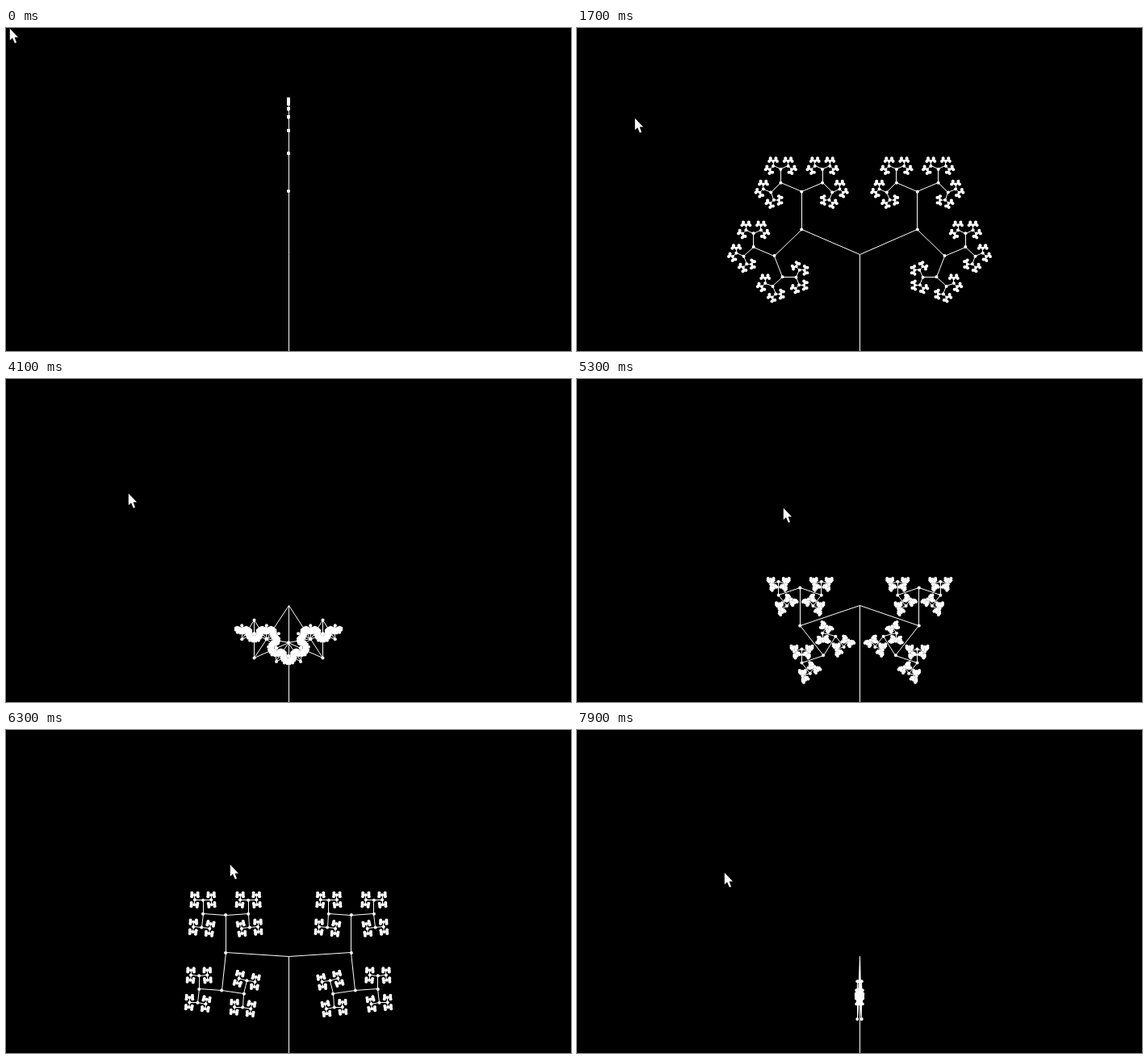
An HTML page with a canvas that plays this animation: 700x400 px, repeating every 8000 ms.

```html
<!DOCTYPE html>
<html lang="en">
<head>
<meta charset="utf-8">
<title>Recursive tree</title>
<style>
  html, body { margin: 0; width: 100%; height: 100%; overflow: hidden; background: #000; }
  canvas { display: block; }
</style>
</head>
<body>
<canvas id="stage" width="700" height="400"></canvas>
<script>
const ctx = document.getElementById("stage").getContext("2d");
const LOOP = 8000, STEP = 100;
const TRUNK = 120, FIRST = 78, RATIO = 0.6, MIN = 2, DOT = 2;
const RAD = Math.PI / 180;

// stops and turns of the pointer: [ms, x, y]
const stops = [
  [400, 4, 0], [1300, 42, 111], [1700, 71, 111], [2100, 98, 116],
  [3300, 98, 116], [3400, 98, 117], [4100, 151, 141], [5100, 223, 155],
  [5300, 255, 159], [5800, 293, 162], [5900, 293, 162], [6300, 277, 166],
  [6800, 254, 169], [7900, 182, 176]
];

const arrow = new Path2D("M0.8 0.8V15.3L4 12.3L6.8 18.8L9 18L6.6 11.6H11Z");

function pointerAt(t) {
  const i = Math.max(1, stops.findIndex(s => s[0] >= t));
  const [t0, x0, y0] = stops[i - 1], [t1, x1, y1] = stops[i];
  const k = Math.max(0, (t - t0) / (t1 - t0));
  return [Math.round(x0 + (x1 - x0) * k), Math.round(y0 + (y1 - y0) * k)];
}

// line ends sit on pixel centres
const snap = v => Math.floor(v + 1e-6) + 0.5;

function line(x0, y0, x1, y1) {
  ctx.beginPath();
  ctx.moveTo(snap(x0), snap(y0));
  ctx.lineTo(snap(x1), snap(y1));
  ctx.stroke();
}

function dot(x, y) {
  ctx.beginPath();
  ctx.arc(x, y, DOT, 0, 2 * Math.PI);
  ctx.fill();
}

function branch(x, y, len, dir, turn) {
  if (len < MIN) return;
  for (const a of [dir + turn, dir - turn]) {
    const ex = x + len * Math.sin(a), ey = y - len * Math.cos(a);
    line(x, y, ex, ey);
    dot(ex, ey);
    branch(ex, ey, len * RATIO, a, turn);
  }
}

function drawPointer(x, y) {
  ctx.save();
  ctx.translate(x, y);
  ctx.strokeStyle = "#000";
  ctx.lineWidth = 2;
  ctx.stroke(arrow);
  ctx.fill(arrow);
  ctx.restore();
}

function draw(t) {
  const [x, y] = pointerAt(t);
  ctx.fillStyle = "#000";
  ctx.fillRect(0, 0, 700, 400);
  ctx.fillStyle = ctx.strokeStyle = "#fff";
  ctx.lineWidth = 1;
  line(350, 400, 350, 400 - TRUNK);
  // one degree of spread per pixel of pointer travel
  branch(350, 400 - TRUNK, FIRST, 0, (x - 4) * RAD);
  drawPointer(x, y);
}

let last = -1;
function tick() {
  const t = Math.floor((performance.now() % LOOP) / STEP) * STEP;
  if (t !== last) draw(last = t);
  requestAnimationFrame(tick);
}
tick();
</script>
</body>
</html>
```
